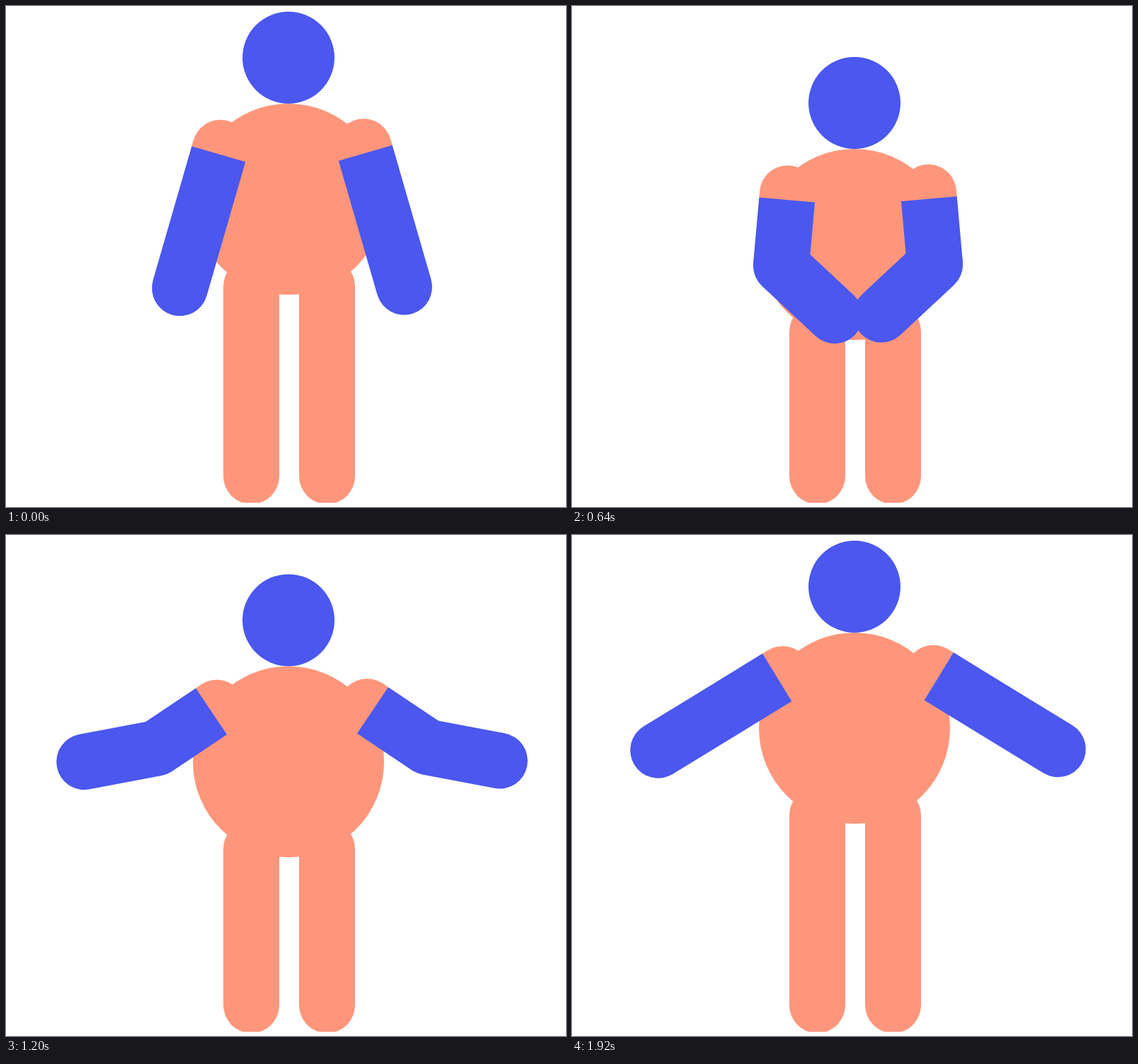
Animation of 791x708 px, one loop 1.96 s. Source, as an HTML page with a canvas:

```html
<!DOCTYPE html>
<html lang="en">
<head>
<meta charset="utf-8">
<title>Squat and raise</title>
<style>
  html, body { margin: 0; height: 100%; overflow: hidden; background: #fff; }
  canvas { display: block; }
</style>
</head>
<body>
<canvas id="stage" width="791" height="708"></canvas>
<script>
const ctx = document.getElementById('stage').getContext('2d');
const BLUE = '#4b57ee', PINK = '#ff967c';
const LOOP = 1960, STEP = 40;
const LIMB = 79, UPPER = 111.7, FORE = 103.6;

// [ms, degrees]: upper arm away from straight down, and elbow bend
const RAISE = [[0, 16.1], [320, 4.3], [480, 2.8], [640, 5.1], [820, 13.5], [1000, 29.8],
  [1120, 43.4], [1360, 78.2], [1500, 81.6], [1560, 81.2], [1680, 78], [1920, 58.5]];
const BEND = [[0, 0], [320, -70.3], [440, -87], [640, -52.1], [760, -26], [900, -2], [1000, 0],
  [1120, 0], [1360, 89], [1560, 52.6], [1680, 27.4], [1760, 8], [1840, 0], [1920, 0]];
// [ms, pixels]: how far the body sinks
const SINK = [[0, 0], [320, 64], [1120, 64], [1360, 0], [1920, 0]];

// Monotone cubic interpolation
function curve(keys, t) {
  const last = keys.length - 1;
  const slope = i => (keys[i + 1][1] - keys[i][1]) / (keys[i + 1][0] - keys[i][0]);
  const tangent = i => {
    if (i === 0 || i === last) return 0;
    const a = slope(i - 1), b = slope(i);
    return a * b <= 0 ? 0 : 2 * a * b / (a + b);
  };
  let i = 0;
  while (i < last - 1 && t >= keys[i + 1][0]) i++;
  const [t0, v0] = keys[i], [t1, v1] = keys[i + 1];
  const span = t1 - t0, s = (t - t0) / span, r = 1 - s;
  return v0 * r * r * (1 + 2 * s) + v1 * s * s * (3 - 2 * s)
    + span * s * r * (tangent(i) * r - tangent(i + 1) * s);
}

function disc(x, y, r, color) {
  ctx.fillStyle = color;
  ctx.beginPath();
  ctx.arc(x, y, r, 0, 2 * Math.PI);
  ctx.fill();
}

function stroke(points, color, cap) {
  ctx.strokeStyle = color;
  ctx.lineWidth = LIMB;
  ctx.lineCap = cap;
  ctx.lineJoin = 'round';
  ctx.beginPath();
  points.forEach(p => ctx.lineTo(...p));
  ctx.stroke();
}

// side is -1 for the left arm, 1 for the right
function arm(x, y, side, raise, bend) {
  const along = ([px, py], deg, length) => {
    const a = deg * Math.PI / 180;
    return [px + side * Math.sin(a) * length, py + Math.cos(a) * length];
  };
  const pivot = [x, y];
  const shoulder = along(pivot, raise, 9), sleeve = along(pivot, raise, 18.3);
  const elbow = along(pivot, raise, UPPER), hand = along(elbow, raise + bend, FORE);
  disc(...shoulder, LIMB / 2, PINK);
  stroke([shoulder, sleeve], PINK, 'butt');
  stroke([sleeve, elbow], BLUE, 'butt');
  stroke([elbow, hand], BLUE, 'round');
}

function draw(t) {
  const sink = curve(SINK, t), raise = curve(RAISE, t), bend = curve(BEND, t);
  ctx.fillStyle = '#fff';
  ctx.fillRect(0, 0, 791, 708);

  disc(399, 73 + sink, 65, BLUE);
  disc(399, 273 + sink, 135, PINK);
  for (const x of [346.5, 453.5]) stroke([[x, 396 + sink], [x, 664.5]], PINK, 'round');
  ctx.fillStyle = '#fff';
  ctx.fillRect(0, 702, 791, 6); // flat soles

  arm(305.3, 191.7 + sink, -1, raise, bend);
  arm(502.7, 190.2 + sink, 1, raise, bend);
}

const start = performance.now();
function tick() {
  const t = (performance.now() - start) % LOOP;
  draw(Math.floor(t / STEP) * STEP);
  requestAnimationFrame(tick);
}
tick();
</script>
</body>
</html>
```
